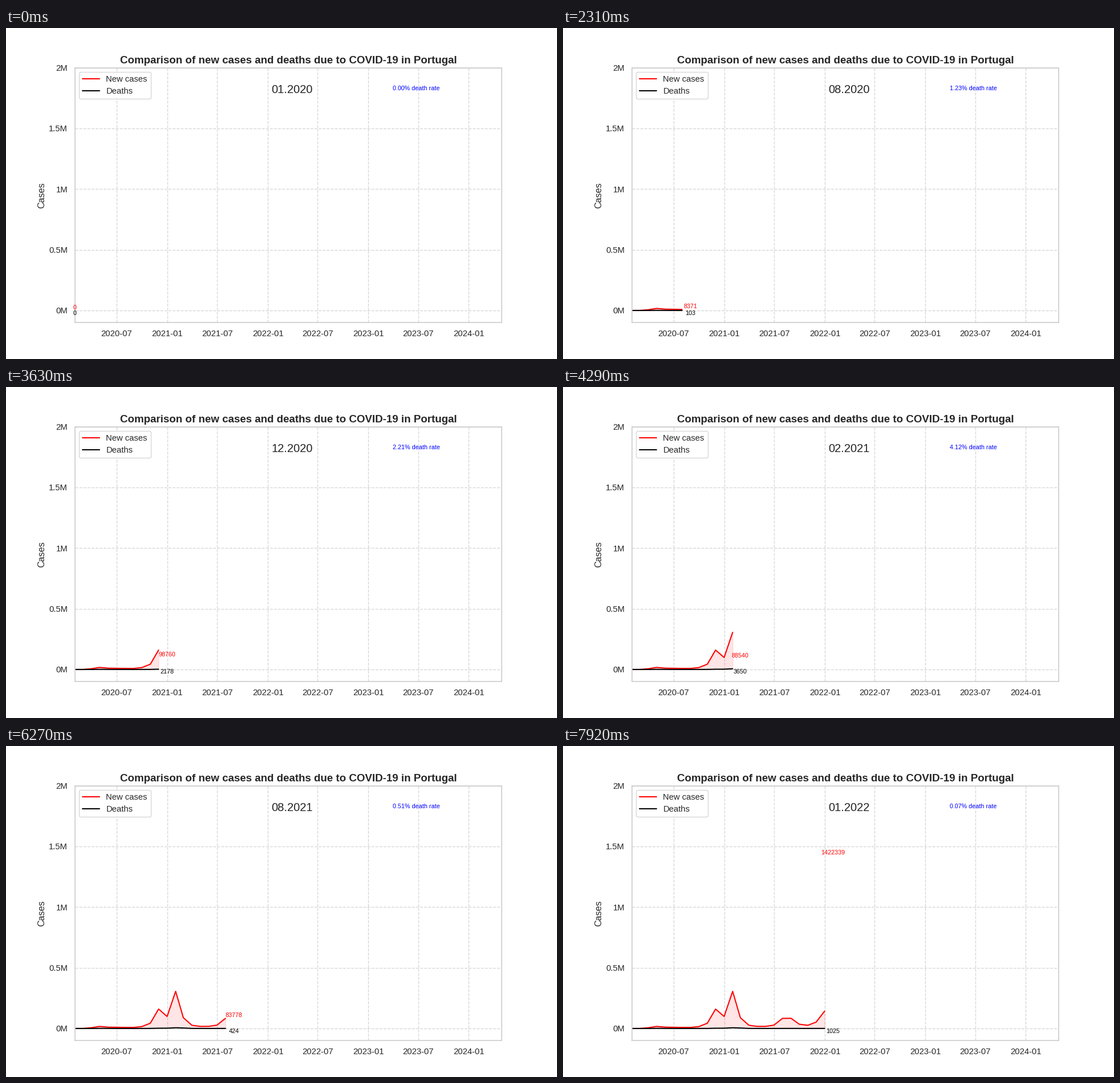
These frames come from a looping animation (966 px wide and 580 px high, 8 s). A matplotlib script:

```python
import matplotlib.pyplot as plt
import numpy as np
from matplotlib import dates as mdates
from matplotlib.animation import FuncAnimation

STEP = 330        # ms per month
INTERVAL = 40
LOOP = 8000
K = 0.966         # points to the 100 dpi stage

CASES = [0, 0, 5962, 16900, 10692, 9714, 8470, 8371, 15436, 43180, 159870,
         98760, 306120, 88540, 26480, 17127, 17460, 27530, 83120, 83778,
         34870, 26130, 52140, 142310, 1422339]
DEATHS = [0, 0, 119, 856, 507, 160, 155, 103, 134, 363, 2040,
          2178, 5750, 3650, 520, 122, 48, 72, 262, 424,
          231, 161, 261, 427, 1025]

plt.rcParams.update({
    "font.family": "Liberation Sans",
    "text.color": ".15",
    "axes.labelcolor": ".15",
    "axes.edgecolor": ".8",
    "axes.linewidth": 1.25 * K,
    "axes.axisbelow": True,
    "lines.linewidth": 1.5 * K,
    "lines.solid_capstyle": "round",
    "patch.linewidth": 1 * K,
    "legend.fontsize": 11 * K,
})

# month ends, January 2020 to April 2024
month_starts = np.arange("2020-02", "2024-06", dtype="datetime64[M]")
days = mdates.date2num(month_starts.astype("datetime64[D]")) - 1

fig, ax = plt.subplots(figsize=(9.66, 5.8), dpi=100)
fig.subplots_adjust(left=0.125, right=0.9, bottom=0.11, top=0.88)
ax.set_xlim(days[0], days[-1])
ax.set_ylim(-1e5, 2e6)
ax.xaxis.set_major_locator(mdates.MonthLocator(bymonth=(1, 7)))
ax.xaxis.set_major_formatter(mdates.DateFormatter("%Y-%m"))
ax.set_yticks(np.arange(5) * 5e5, ["0M", "0.5M", "1M", "1.5M", "2M"])
ax.tick_params(left=False, bottom=False, length=6 * K, pad=3.5 * K,
               labelsize=11 * K, labelcolor=".15")
ax.grid(color=".8", linestyle="--", linewidth=1 * K, alpha=0.8)
ax.set_title("Comparison of new cases and deaths due to COVID-19 in Portugal",
             fontsize=14 * K, fontweight="bold", pad=6 * K)
ax.set_ylabel("Cases", fontsize=12 * K, labelpad=4 * K)

case_line, = ax.plot([], [], color="red", label="New cases")
death_line, = ax.plot([], [], color="black", label="Deaths")
ax.legend(loc="upper left", framealpha=0.8, edgecolor=".8")

label = dict(fontsize=8 * K, ha="center")
case_text = ax.text(days[0], 0, "", color="red", va="bottom", **label)
death_text = ax.text(days[0], 0, "", color="black", va="top", **label)
month_text = ax.text(0.46, 0.9, "", fontsize=15 * K, transform=ax.transAxes)
rate_text = ax.text(0.8, 0.912, "", color="blue", transform=ax.transAxes, **label)
areas = []


def put(text, i, value):
    text.set_position((days[i], value))
    text.set_text(str(value))


def update(n):
    i = min((n * INTERVAL + INTERVAL - 1) // STEP, len(CASES) - 1)
    cases, deaths = CASES[i], DEATHS[i]
    # the curves trail the labels by one month
    case_line.set_data(days[:i], CASES[:i])
    death_line.set_data(days[:i], DEATHS[:i])
    while areas:
        areas.pop().remove()
    if i > 1:
        areas.append(ax.fill_between(days[:i], CASES[:i], DEATHS[:i],
                                     color="red", alpha=0.1))
    put(case_text, i, cases)
    put(death_text, i, deaths)
    month_text.set_text(f"{i % 12 + 1:02d}.{2020 + i // 12}")
    rate = 100 * deaths / cases if cases else 0
    rate_text.set_text(f"{rate:.2f}% death rate")
    return case_line, death_line, case_text, death_text, month_text, rate_text


anim = FuncAnimation(fig, update, frames=LOOP // INTERVAL, interval=INTERVAL,
                     init_func=lambda: update(0), repeat=True, repeat_delay=0)
plt.show()
```
